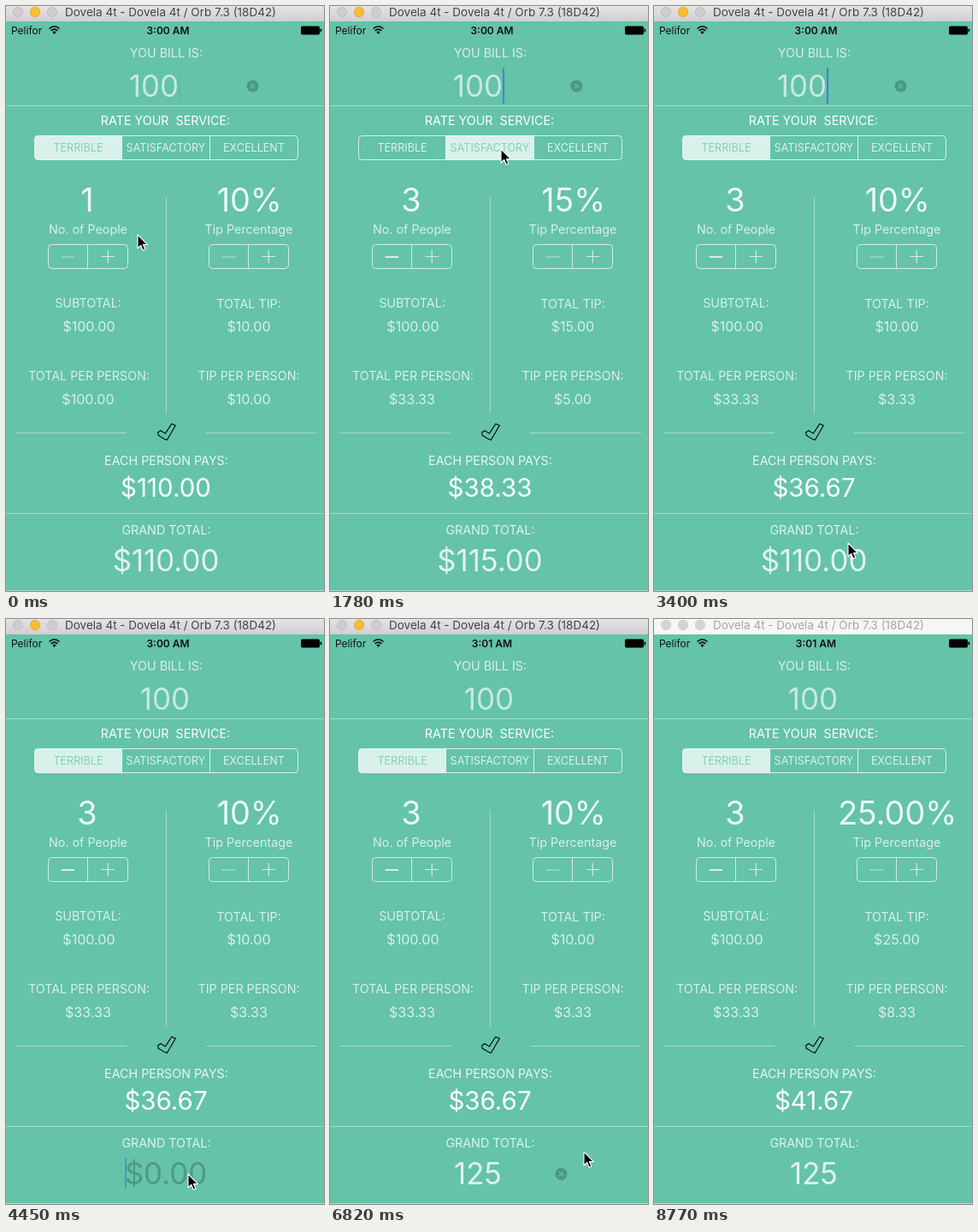
Animation of 372x683 px, one loop 8870 ms. Source, as an HTML page:

```html
<!DOCTYPE html>
<html lang="en">
<head>
<meta charset="utf-8">
<title>Tip calculator</title>
<style>
html, body { margin: 0; width: 100%; height: 100%; overflow: hidden; background: #64c3a8; }
svg { display: block; width: 372px; height: 683px; font-family: Inter, Roboto, sans-serif; }
</style>
</head>
<body>
<svg id="stage" viewBox="0 0 372 683" xmlns="http://www.w3.org/2000/svg"></svg>
<script>
const LOOP = 8870, TICK = 148.6;
const stage = document.getElementById('stage');

function add(tag, attrs, text) {
  const el = document.createElementNS(stage.namespaceURI, tag);
  set(el, attrs);
  if (text) el.textContent = text;
  return stage.appendChild(el);
}
function set(el, attrs) {
  for (const k in attrs) el.setAttribute(k, attrs[k]);
}
const white = a => `rgba(255,255,255,${a})`;
const label = (text, x, y, size = 14.3, fill = white(.75), weight = 400, anchor = 'middle') =>
  add('text', { x, y, fill, 'font-size': size, 'font-weight': weight, 'text-anchor': anchor }, text);
const path = (d, stroke, width = 1, more = {}) =>
  add('path', { d, stroke, 'stroke-width': width, fill: 'none', ...more });
const show = (el, on) => el.setAttribute('opacity', +on);

// Window bar
add('rect', { width: 372, height: 683, fill: '#64c3a8' });
const grad = add('linearGradient', { id: 'bar', x2: 0, y2: 1 });
[['0', '#e5e3e5'], ['1', '#d1cfd1']].forEach(([offset, color]) =>
  grad.appendChild(add('stop', { offset, 'stop-color': color })));
const bar = add('rect', { width: 372, height: 18 });
const lights = [14, 34, 54].map(cx => add('circle', { cx, cy: 7, r: 5.7 }));
const title = label('Dovela 4t - Dovela 4t / Orb 7.3 (18D42)', 69, 12, 13.5, '#444', 400, 'start');

// Status bar
label('Pelifor', 6, 32.5, 12, '#111', 400, 'start');
path('M50.5 26.5Q56.5 21 62.5 26.5M52.6 28.9Q56.5 25.4 60.4 28.9', '#111', 1.6);
path('M54.3 30.5Q56.5 28.6 58.7 30.5L56.5 33Z', 'none', 0, { fill: '#111' });
const clock = label('', 189.5, 32.5, 12, '#111', 600);
add('rect', { x: 345, y: 23.5, width: 22, height: 10, rx: 1.8, fill: '#000' });
add('rect', { x: 367.6, y: 26.5, width: 1.5, height: 4, rx: .7, fill: '#000' });

// Rules
path('M0 116.5H372M0 592.5H372M187.5 223V476M11 498.5H141M234 498.5H364', white(.42));
path('M0 682.5H372', white(.45));

// Labels
label('YOU BILL IS:', 187.5, 60);
label('RATE YOUR\u00a0 SERVICE:', 186.5, 139, 14.3, '#fff');
label('No. of People', 96, 266);
label('Tip Percentage', 284, 266);
label('SUBTOTAL:', 96, 352);
label('TOTAL TIP:', 284, 353);
label('TOTAL PER PERSON:', 97, 437);
label('TIP PER PERSON:', 284, 437);
label('EACH PERSON PAYS:', 187.5, 536, 14.3, white(.85));
label('GRAND TOTAL:', 187.5, 617, 14.3, white(.8));
path('M177.6 498L181 495.8L186.3 499.1L193.8 487.8L198.3 489.8L188.3 506.8L185.4 505.6L178.2 501.2Z',
  '#000', 1.1, { 'stroke-linejoin': 'round' });

// Segmented control
const segX = [33.5, 135.5, 238.5, 341.5];
const fills = [
  'M135.5 151.5H37.5a4 4 0 0 0-4 4v20a4 4 0 0 0 4 4H135.5Z',
  'M135.5 151.5H238.5V179.5H135.5Z',
  'M238.5 151.5H337.5a4 4 0 0 1 4 4v20a4 4 0 0 1-4 4H238.5Z'
].map(d => path(d, 'none', 0, { fill: '#d8f1ea' }));
const segText = ['TERRIBLE', 'SATISFACTORY', 'EXCELLENT'].map((s, i) =>
  label(s, (segX[i] + segX[i + 1]) / 2, 170, 12.6));
add('rect', { x: 33.5, y: 151.5, width: 308, height: 28, rx: 4, fill: 'none', stroke: white(.75) });
path('M135.5 151.5V179.5M238.5 151.5V179.5', white(.75));

// Steppers
function stepper(x) {
  add('rect', { x, y: 278.5, width: 93, height: 28, rx: 4, fill: 'none', stroke: white(.7) });
  path(`M${x + 46} 278.5v28`, white(.7));
  path(`M${x + 62} 292.5h15.5m-7.75 -7.75v15.5`, white(.7), 1.2);
  return path(`M${x + 15} 293h15.5`, '#fff', 1.6);
}
const minus = stepper(49.5);
show(stepper(237.5), .35);

// Values
const people = label('', 95, 240, 37.8, white(.88));
const rate = label('', 284.8, 240, 37.8, white(.88));
const subtotal = label('$100.00', 97, 380, 16.1);
const tip = label('', 284, 380, 16.1);
const perPerson = label('', 96, 465, 16.1);
const tipPer = label('', 284, 465, 16.1);
const each = label('', 187, 573, 29.5, '#fff');
const bill = label('100', 173, 106, 35, white(.64));
const total = label('', 187, 660, 34.8, white(.8));

// Editing marks
function clearButton(cx, cy) {
  const g = add('g', {});
  g.append(
    add('circle', { cx, cy, r: 7, fill: '#4a9882' }),
    path(`M${cx - 2.6} ${cy - 2.6}l5.2 5.2m0 -5.2l-5.2 5.2`, '#64c3a8', 1.2));
  return g;
}
const billClear = clearButton(288.5, 93.5);
const totalClear = clearButton(270.5, 648);
const billCaret = add('rect', { x: 202, y: 72, width: 2, height: 42, fill: '#3f7fe0' });
const totalCaret = add('rect', { y: 629, width: 2, height: 36, fill: '#3474cf' });

const arrow = path('M0 0V16L3.7 12.5L6.2 18.3L8.9 17.1L6.4 11.6H11.4Z', '#fff', 1.1,
  { fill: '#000', 'stroke-linejoin': 'round' });

// Pointer route: tick, x, y
const route = [
  [0, 154, 267], [3, 119, 288], [5, 120, 293], [7, 125, 304], [8, 130, 296],
  [11, 188, 168], [12, 200, 167], [14, 308, 168], [15, 300, 167], [16, 205, 165],
  [18, 90, 166], [19, 95, 178], [21, 165, 420], [23, 227, 627], [25, 213, 648],
  [43, 213, 648], [46, 297, 622], [50, 303, 517], [51, 303, 517], [53, 314, 226],
  [55, 349, 670], [59, 349, 670]
];
function pointer(i) {
  const k = Math.max(1, route.findIndex(p => p[0] >= i));
  const [a, x0, y0] = route[k - 1], [b, x1, y1] = route[k];
  const f = (i - a) / (b - a);
  return [x0 + (x1 - x0) * f, y0 + (y1 - y0) * f];
}

const clamp = v => Math.max(0, Math.min(1, v));
const money = v => '$' + v.toFixed(2);

function blink(t) {
  const p = t / 1020 % 1;
  return p < .2 ? clamp(.1 - p * 12) : p < .7 ? clamp((p - .2) / .14) : clamp((1.02 - p) / .3);
}
function totalBlink(i) {
  if (i < 26 || i > 43 || i === 31 || i === 32) return 0;
  return i === 30 || i === 33 || i === 43 ? .5 : 1;
}

function draw(ms) {
  const i = Math.min(59, Math.floor(ms / TICK + .12));
  const n = i < 3 ? 1 : i < 5 ? 2 : 3;
  const sel = i < 12 || i >= 19 ? 0 : i < 16 ? 1 : 2;
  const custom = i >= 48;
  const pct = custom ? 25 : 10 + 5 * sel;
  const active = i < 59;

  bar.setAttribute('fill', active ? 'url(#bar)' : '#f6f6f6');
  lights.forEach((c, k) => set(c, active
    ? { fill: k === 1 ? '#f8bd32' : '#cfcdcf', stroke: k === 1 ? '#dda02a' : '#b9b7b9', 'stroke-width': .7 }
    : { fill: '#d4d4d4', stroke: '#c6c6c6', 'stroke-width': .7 }));
  title.setAttribute('fill', active ? '#444' : '#a6a6a6');
  clock.textContent = i < 34 ? '3:00 AM' : '3:01 AM';

  fills.forEach((f, k) => show(f, k === sel));
  segText.forEach((s, k) => s.setAttribute('fill', k === sel ? '#86d0bb' : white(.78)));
  show(minus, n > 1 ? .9 : .35);

  people.textContent = n;
  rate.textContent = custom ? pct.toFixed(2) + '%' : pct + '%';
  tip.textContent = money(pct);
  perPerson.textContent = money(100 / n);
  tipPer.textContent = money(pct / n);
  each.textContent = money((100 + pct) / n);

  const billFocus = i < 26;
  bill.setAttribute('x', billFocus ? 173 : 186);
  show(billClear, billFocus);
  show(billCaret, billFocus ? blink(i * TICK) : 0);

  // Typing into the grand total
  const typed = i < 35 ? '' : '125'.slice(0, i < 39 ? 1 : i < 41 ? 2 : 3);
  const editing = typed && !custom;
  total.textContent = billFocus ? money(100 + pct) : typed || '$0.00';
  set(total, {
    x: editing ? 173 : 187,
    fill: billFocus || typed ? white(.8) : 'rgba(0,0,25,.22)'
  });
  show(totalClear, !!editing);
  totalCaret.setAttribute('x', [139, 180, 191, 201][typed.length]);
  show(totalCaret, totalBlink(i));

  const [x, y] = pointer(i);
  arrow.setAttribute('transform', `translate(${x.toFixed(1)} ${y.toFixed(1)})`);
  show(arrow, i < 54 || i === 56);
}

const start = performance.now();
function frame() {
  draw((performance.now() - start) % LOOP);
  requestAnimationFrame(frame);
}
frame();
</script>
</body>
</html>
```
